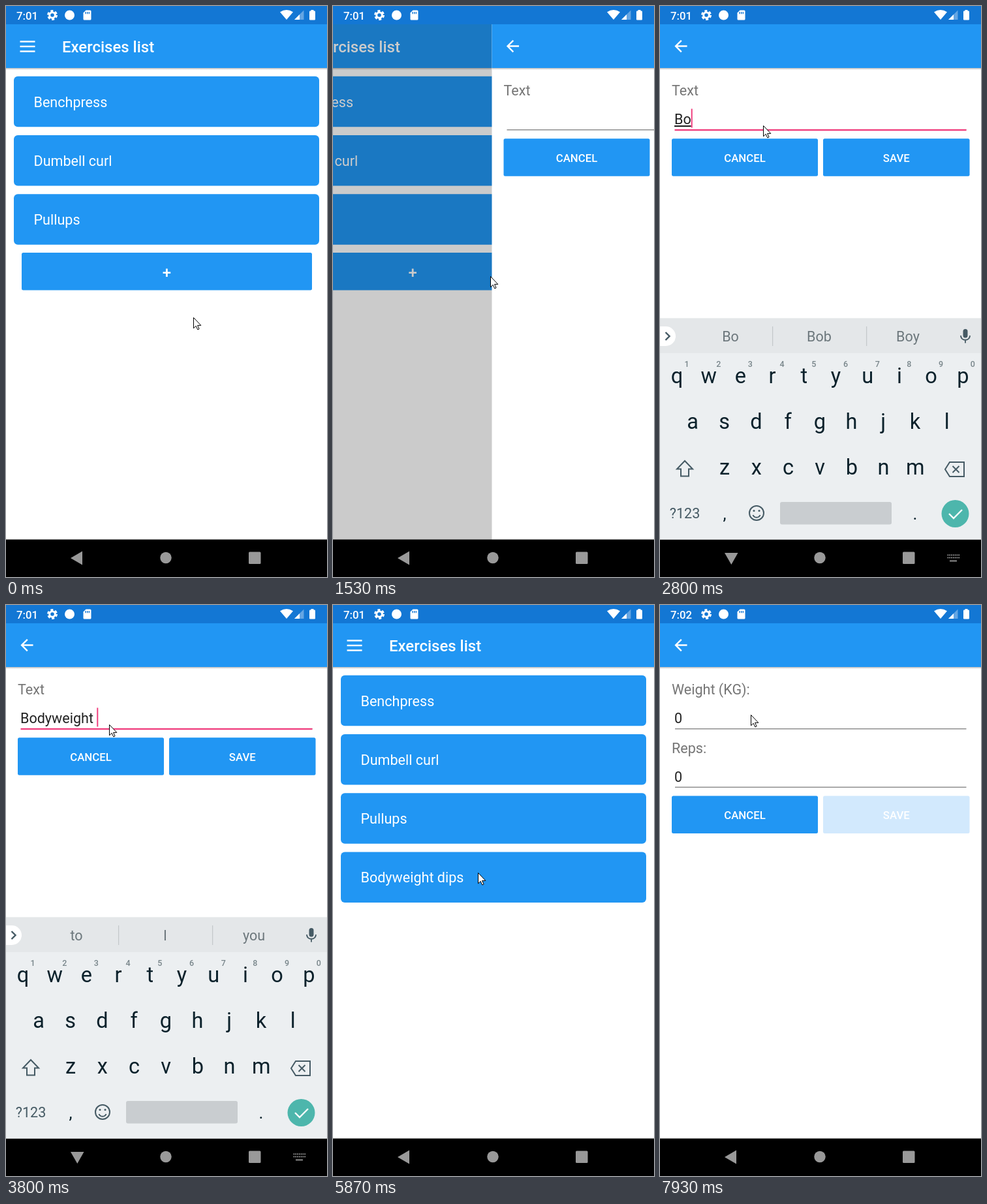
An HTML page for the animation above (8000 ms loop, 492 by 875 pixels).

```html
<!DOCTYPE html>
<html lang="en">
<head>
<meta charset="utf-8">
<title>Exercise tracker</title>
<style>
html, body { margin: 0; width: 100%; height: 100%; overflow: hidden; background: #fff; }
svg { display: block; width: 492px; height: 875px; }
text { font-family: Roboto, sans-serif; font-size: 21.55px; white-space: pre; }
</style>
</head>
<body>
<svg id="stage" viewBox="0 0 492 875"></svg>
<script>
const BLUE = '#2196f3', PINK = '#f0407f', LOOP = 8000;

// Markup helpers
const rect = (x, y, w, h, fill, r = 0) =>
  `<rect x="${x}" y="${y}" width="${w}" height="${h}" rx="${r}" fill="${fill}"/>`;
const text = (x, y, s, fill = '#fff', attrs = '') =>
  `<text x="${x}" y="${y}" fill="${fill}" ${attrs}>${s}</text>`;
const path = (d, attrs) => `<path d="${d}" ${attrs}/>`;
const line = (d, color, width) => path(d, `fill="none" stroke="${color}" stroke-width="${width}"`);
const group = (id, body) => `<g id="${id}">${body}</g>`;
const MID = 'text-anchor="middle"', BOLD = 'font-weight="500"';
const size = px => `style="font-size:${px}px"`;

const MENU = rect(21.5, 53.3, 23, 2.4, '#fff') + rect(21.5, 60.8, 23, 2.4, '#fff') + rect(21.5, 68.3, 23, 2.4, '#fff');
const BACK = path('M20 11H7.83l5.59-5.59L12 4l-8 8 8 8 1.41-1.41L7.83 13H20z',
  'fill="#fff" transform="translate(17.6 47.2) scale(1.197)"');

const page = (id, icon, title, body) => group(id,
  rect(0, 28, 492, 790, '#fff') + rect(0, 95, 492, 3, 'url(#shade)') + rect(0, 28, 492, 67, BLUE) +
  icon + text(86, 71, title, '#fff', BOLD + size(23.94)) + body);

const button = (x, y, w, label, fill = BLUE, px = 16.75) =>
  rect(x, y, w, 57.5, fill, 2.5) +
  text(x + w / 2, y + (px > 20 ? 38.5 : 35.2), label, '#fff', MID + BOLD + size(px));

const card = (i, label) =>
  rect(12, 107.8 + i * 90.2, 468, 77.5, BLUE, 6) + text(42.5, 154.5 + i * 90.2, label);

const field = (y, label, value) =>
  text(18, y + 8, label, '#757575') + text(22, y + 52, value, '#212121') + rect(23, y + 60, 446.5, 1.5, '#8f8f8f');

const actions = y => button(18, y, 224, 'CANCEL') +
  group('save' + y, button(250, y, 224.5, 'SAVE', '#d2e9fd'));

function keyboard() {
  const dark = '#0b212b', grey = '#455a64';
  let s = rect(0, 478.5, 492, 339, '#eceff1') + rect(0, 478.5, 492, 53.5, '#e4e7e9');
  s += rect(-20, 491, 44, 30, '#fff', 15) + line('M8.5 500l6 6-6 6', grey, 2.4);
  for (const x of [172, 316]) s += rect(x, 491, 1.2, 30, '#c3c8ca');
  [108, 244, 380].forEach((x, i) => s += text(x, 514, '', '#6c777c', `${MID} id="word${i}"`));
  s += rect(464.5, 495, 7, 13.5, grey, 3.5) + line('M461 505c0 9 14 9 14 0M468 512v4.5', grey, 1.8);

  ['qwertyuiop', 'asdfghjkl', 'zxcvbnm'].forEach((row, r) => [...row].forEach((c, i) => {
    const x = [26, 50, 99][r] + i * 48.7;
    s += text(x, 578 + r * 70.2, c, dark, MID + size(32.5));
    if (!r) s += text(x + 15, 553, (i + 1) % 10, '#78858a', MID + BOLD + size(12.5));
  }));

  s += line('M38 697l-12 12.5h6v11h12v-11h6z', grey, 2);
  s += line('M444 699h22v22h-22l-7-11zM448.5 705l10 10M458.5 705l-10 10', grey, 2);
  s += text(38, 785, '?123', grey, MID) + text(99, 787, ',', dark, MID + size(26)) + text(391, 787, '.', dark, MID + size(26));
  s += line('M137 777a11 11 0 1 0 22 0a11 11 0 1 0-22 0M142.5 780c2 5 9 5 11 0', grey, 2);
  s += rect(142.5, 772, 3, 3, grey, 1.5) + rect(150.5, 772, 3, 3, grey, 1.5);
  s += rect(184, 760, 171, 34.5, '#c9cdd0', 3);
  s += '<circle cx="452.5" cy="778" r="21" fill="#4db6ac"/>' + line('M443 778l7 7 13-13', '#fff', 2.4);
  return s;
}

function statusBar() {
  let s = rect(0, 0, 492, 28, '#1377d4') + text(16, 20.5, '', '#fff', `${BOLD} id="clock" ${size(16.75)}`);
  s += '<g fill="none" stroke="#fff" stroke-width="3"><circle cx="71" cy="14" r="4.3"/>' +
    '<circle cx="71" cy="14" r="6.5" stroke-dasharray="3.9 2.907"/></g>';
  s += '<circle cx="97.5" cy="14" r="7.5" fill="#fff"/>';
  s += path('M122.5 6.5h6.5q1.5 0 1.5 1.5v12q0 1.5-1.5 1.5h-9q-1.5 0-1.5-1.5v-9.5z', 'fill="#fff"');
  for (const x of [121.3, 124, 126.7]) s += rect(x, 9, 1.4, 3.2, '#1377d4');
  s += path('M430 21L420 9.3q10-6.6 20 0z', 'fill="#fff"');
  s += path('M456.5 6.5v14.5h-14.5z', 'fill="#fff" opacity=".35"') + path('M450 13v8h-8z', 'fill="#fff"');
  return s + rect(465, 7.5, 9, 14, '#fff', 1.2) + rect(467.5, 6, 4, 3, '#fff');
}

function navBar() {
  let dots = rect(444, 849.5, 11, 1.8, '#999');
  for (let i = 0; i < 14; i++) dots += rect(440.5 + i % 7 * 2.8, 840.5 + (i / 7 | 0) * 4, 1.8, 1.8, '#999');
  return rect(0, 817.5, 492, 58, '#000') + '<circle cx="245" cy="845.5" r="8.7" fill="#999"/>' +
    rect(372, 836.5, 18.5, 18.5, '#999', 1.5) +
    group('navBack', path('M99 846l18-10.5v21z', 'fill="#999"')) +
    group('navHide', path('M99 838h20.5l-10.2 18z', 'fill="#999"') + dots);
}

stage.innerHTML =
  `<defs><linearGradient id="shade" x2="0" y2="1"><stop stop-color="#bbb"/><stop offset="1" stop-color="#fff"/></linearGradient></defs>` +
  page('list', MENU, 'Exercises list',
    card(0, 'Benchpress') + card(1, 'Dumbell curl') + card(2, 'Pullups') +
    group('addExercise', button(24, 378, 445, '+', BLUE, 24)) + group('newExercise', card(3, 'Bodyweight dips'))) +
  page('detail', BACK, 'Bodyweight dips', button(18, 121.3, 456.5, '+', BLUE, 24)) +
  group('dim', rect(0, 28, 492, 790, '#000')) +
  page('nameForm', BACK, '', field(129, 'Text', '<tspan id="typed"></tspan><tspan id="composing" text-decoration="underline"></tspan>') +
    actions(203.3) + group('saveOn', button(250, 203.3, 224.5, 'SAVE')) +
    group('focus', rect(22.5, 188.8, 447, 2.4, PINK)) + `<rect id="caret" y="157.5" width="2" height="29" fill="${PINK}"/>`) +
  page('setForm', BACK, '', field(129, 'Weight (KG):', '0') + field(218.5, 'Reps:', '0') + actions(292.5)) +
  group('status', statusBar()) + group('nav', navBar()) + group('keys', keyboard()) +
  group('cursor', path('M.5.5v16.3l3.7-3.5 2.6 5.6 2.3-1-2.5-5.5h5.2z', 'fill="#fff" stroke="#000"'));

const $ = id => document.getElementById(id);
const show = (id, on) => $(id).setAttribute('opacity', +on);
const move = (id, x, y = 0) => $(id).setAttribute('transform', `translate(${x} ${y})`);
const ramp = (t, from, to) => Math.min(1, Math.max(0, (t - from) / (to - from)));
const smooth = u => u * u * (3 - 2 * u);

// time, x, y
const pointer = [
  [0, 287, 477], [70, 287, 477], [330, 268, 510], [560, 228, 500], [870, 238, 456], [1200, 241, 414],
  [1780, 241, 414], [2130, 158, 183], [4650, 158, 183], [4930, 330, 237], [5190, 330, 237],
  [5870, 222, 410], [6180, 222, 410], [6270, 229, 414], [6520, 229, 414], [7000, 209, 224],
  [7340, 236, 150], [7590, 236, 150], [7930, 139, 168], [LOOP, 139, 168]
];

// time, entered text, suggestions
const typing = [
  [0, '', 'I|The|I\'m'], [2520, 'B', 'B|Be|But'], [2790, 'Bo', 'Bo|Bob|Boy'], [2860, 'Bod', 'Bod|Bid|Body'],
  [3120, 'Body', 'Body|Body\'s|Bodies'], [3320, 'Bodyw', 'Bodyw|Bodywork|Bodyweight'],
  [3460, 'Bodywe', 'Bodywe|Bodywear|Bodyweight'], [3520, 'Bodywei', 'Bodywei|Bodywear|Bodyweight'],
  [3590, 'Bodyweig', 'Bodyweig|Bodywear|Bodyweight'], [3660, 'Bodyweight', 'Bodyweight|Body|Weight'],
  [3790, 'Bodyweight ', 'to|I|you'], [3920, 'Bodyweight di', 'did|di|do'],
  [3990, 'Bodyweight dip', 'dip|do|dips'], [4190, 'Bodyweight dips', 'dips|dis|dipstick']
];

function drawPointer(t) {
  const i = pointer.findIndex(p => p[0] > t);
  const [t0, x0, y0] = pointer[i - 1], [t1, x1, y1] = pointer[i];
  const u = smooth(ramp(t, t0, t1));
  move('cursor', x0 + (x1 - x0) * u, y0 + (y1 - y0) * u);
}

function drawTyping(t) {
  const [since, entry, words] = typing.filter(s => s[0] <= t).pop();
  const split = entry.lastIndexOf(' ') + 1;
  $('typed').textContent = entry.slice(0, split);
  $('composing').textContent = entry.slice(split);
  words.split('|').forEach((w, i) => $('word' + i).textContent = w);
  const focused = t >= 2200;
  show('focus', focused);
  show('saveOn', entry !== '');
  show('caret', focused && (t - Math.max(since, 2200)) % 1000 < 500);
  $('caret').setAttribute('x', 22.5 + (entry && $('typed').parentNode.getComputedTextLength() - .5));
}

function drawPages(t) {
  const saved = t >= 5060;
  const start = saved ? 7370 : 1400;
  const push = 1 - (1 - ramp(t, start, start + 350)) ** 1.5;
  const naming = !saved && push > 0;
  const opened = ramp(t, 6540, 6690);
  show('newExercise', saved);
  show('addExercise', !saved);
  show('detail', opened);
  show('dim', push * .4);
  show('nameForm', naming);
  show('setForm', saved && push > 0);
  move(saved ? 'detail' : 'list', -246 * push);
  move(saved ? 'list' : 'detail', 0);
  move(saved ? 'setForm' : 'nameForm', 492 * (1 - push));
}

function drawKeyboard(t) {
  const rise = ramp(t, 2320, 2470), fall = ramp(t, 5080, 5230);
  const hideable = t >= 2200 && t < 5060;
  show('navHide', hideable);
  show('navBack', !hideable);
  show('keys', rise * (1 - fall * .5) * (fall < 1));
  if (fall > 0) show('keys', 1 - fall ** 1.6);
  move('keys', 0, 38 * (1 - rise) ** 2 + 48 * fall ** 1.26);
}

function frame() {
  const t = performance.now() % LOOP;
  drawPages(t);
  drawTyping(t);
  drawKeyboard(t);
  drawPointer(t);
  $('clock').textContent = t < 6200 ? '7:01' : '7:02';
  requestAnimationFrame(frame);
}
frame();
</script>
</body>
</html>
```
